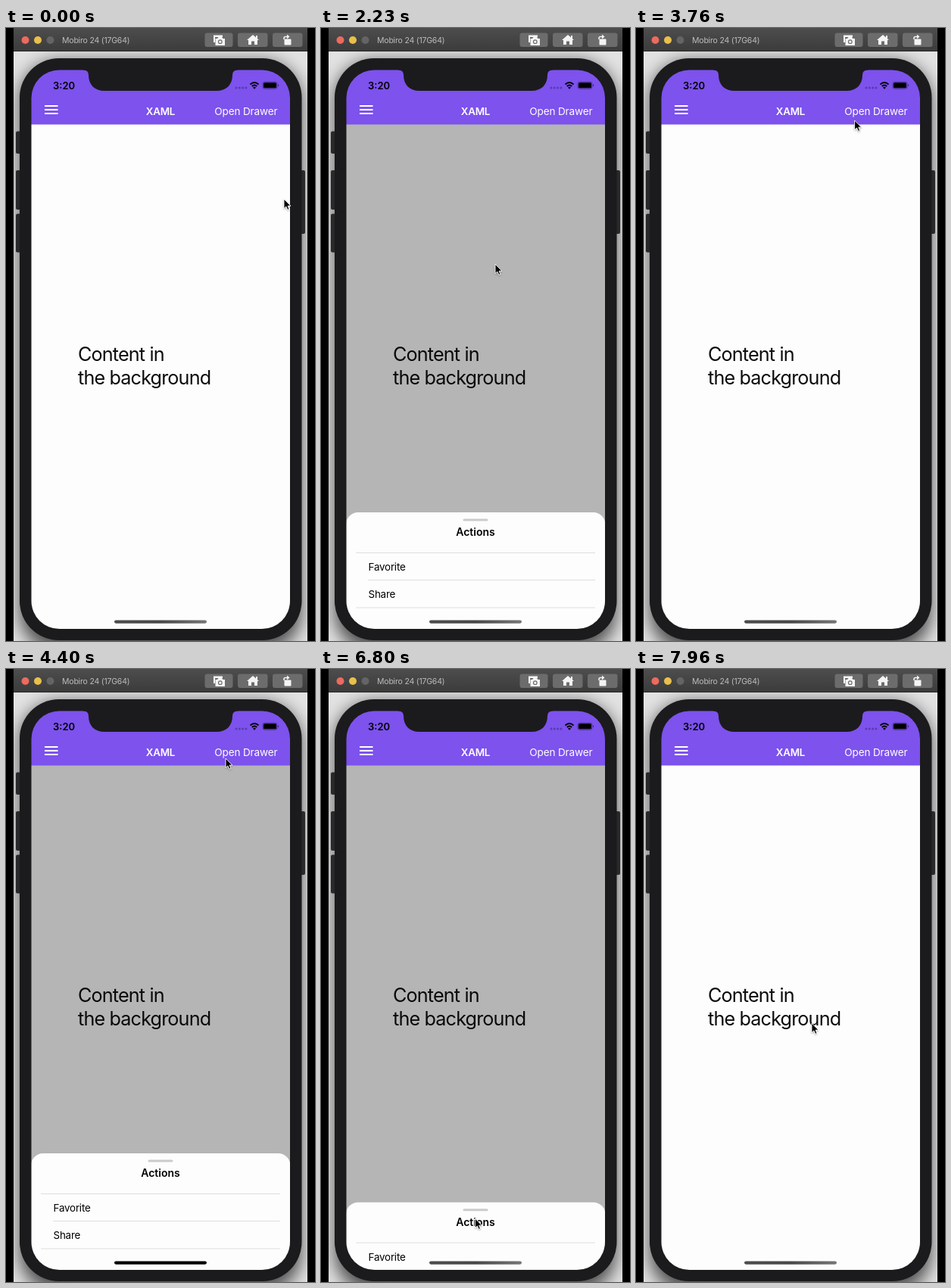
Animation, 408 px wide and 810 px high, one loop 8 s. Source, as an HTML page:

```html
<!DOCTYPE html>
<html lang="en">
<head>
<meta charset="utf-8">
<title>Bottom drawer demo</title>
<style>
  html, body { margin: 0; width: 100%; height: 100%; overflow: hidden; background: #000; }
  svg { display: block; width: 408px; height: 810px; font-family: Inter, Roboto, sans-serif; }
  .item { font-size: 13.4px; letter-spacing: -.2px; }
  .bold { font-weight: 600; }
  #home { mix-blend-mode: multiply; }
</style>
</head>
<body>
<svg viewBox="0 0 408 810">
  <defs>
    <linearGradient id="bar" x2="0" y2="1">
      <stop stop-color="#4d4d4d"/><stop offset="1" stop-color="#3b3b3b"/>
    </linearGradient>
    <linearGradient id="pill">
      <stop stop-color="#4c4c4c"/><stop offset=".5" stop-color="#484848"/><stop offset="1" stop-color="#777"/>
    </linearGradient>
    <filter id="soft" x="-20%" y="-20%" width="140%" height="140%"><feGaussianBlur stdDeviation="11"/></filter>
    <filter id="lift" x="-50%" y="-50%" width="200%" height="200%">
      <feDropShadow dx="0" dy="1" stdDeviation=".8" flood-opacity=".35"/>
    </filter>
    <clipPath id="window"><path d="M10 0H398V810H10Z"/></clipPath>
    <clipPath id="screen"><rect x="33.5" y="55.5" width="341.5" height="738.5" rx="37"/></clipPath>
  </defs>

  <g clip-path="url(#window)">
    <path fill="#e2e2e2" d="M10 0H398V810H10Z"/>
    <rect x="18" y="44" width="372" height="780" rx="52" opacity=".65" filter="url(#soft)"/>
    <path fill="url(#bar)" d="M10 0H398V31H10Z"/>
    <path fill="#262626" d="M10 30H398V31H10Z"/>
  </g>

  <!-- window title bar -->
  <circle cx="25.5" cy="16" r="5" fill="#ed6a5e"/>
  <circle cx="42" cy="16" r="5" fill="#e9bf4c"/>
  <circle cx="58.5" cy="16" r="5" fill="#646464"/>
  <text x="74" y="20" font-size="10.5" letter-spacing="-.2" fill="#bcbcbc">Mobiro 24 (17G64)</text>
  <g fill="#6c6c6c">
    <rect x="262.5" y="6.5" width="37" height="18.5" rx="3"/>
    <rect x="306" y="6.5" width="39.5" height="18.5" rx="3"/>
    <rect x="352" y="6.5" width="39.5" height="18.5" rx="3"/>
  </g>
  <g fill="#f4f4f4">
    <path d="M274 9.5H286V12H276V19H274Z"/>
    <path d="M276.500 14H279L280.500 12H285L286.500 14H289V23H276.500Z"/>
    <path d="M326 9L334 16H332V22H328V17.500H324V22H320V16H318ZM330 10H332V14H330Z"/>
    <rect x="367.500" y="14.500" width="9" height="8" rx="1"/>
    <path d="M371 8.500L374.500 11.500L371 14.500Z"/>
  </g>
  <circle cx="282.800" cy="18.200" r="2.300" fill="none" stroke="#6c6c6c" stroke-width="1.200"/>
  <path d="M367 15V13.500Q367 11.500 369 11.500H372" fill="none" stroke="#f4f4f4" stroke-width="1.500"/>

  <!-- phone body -->
  <g fill="#29292b">
    <rect x="13" y="136.500" width="7" height="29.500" rx="2"/>
    <rect x="13" y="188" width="7" height="52" rx="2"/>
    <rect x="13" y="245.500" width="7" height="51" rx="2"/>
    <rect x="388" y="188" width="7" height="84" rx="2"/>
  </g>
  <rect x="18" y="40" width="372.500" height="769" rx="52" fill="#1b1b1d"/>

  <g clip-path="url(#screen)">
    <path fill="#fdfdfd" d="M33 55H376V795H33Z"/>
    <g font-size="25.200" letter-spacing="-.85" fill="#0c0c0c">
      <text x="95" y="439.800">Content in</text>
      <text x="95" y="471">the background</text>
    </g>
    <path id="scrim" d="M33 127H376V795H33Z"/>
    <path fill="#7d52ed" d="M33 55H376V127.500H33Z"/>

    <g id="drawer">
      <rect x="33" y="640" width="342.500" height="190" rx="16" fill="#fdfdfd"/>
      <rect x="187.500" y="648.500" width="33" height="3" rx="1.500" fill="#cbcbcb"/>
      <text x="204" y="671" font-size="14" class="bold" text-anchor="middle">Actions</text>
      <path d="M46 693.500H362M62 729.500H362M46 766H362" stroke="#dedede"/>
      <text x="62.500" y="717" class="item">Favorite</text>
      <text x="62.500" y="753" class="item">Share</text>
    </g>
    <rect id="home" x="143" y="782.400" width="122" height="4.300" rx="2.100"/>
  </g>

  <!-- notch, status and navigation -->
  <path fill="#1b1b1d" d="M102 54V55.500Q109 55.500 109 62C109 75 117 83 130 83H278C291 83 299 75 299 62Q299 55.500 306 55.500V54Z"/>
  <text x="62" y="80.500" font-size="13" class="bold">3:20</text>
  <path d="M304 79H318" stroke="#5a3bb2" stroke-width="3" stroke-linecap="round" stroke-dasharray="0 4.300"/>
  <path d="M322.500 74.500Q328 69.500 333.500 74.500M324.800 77Q328 74 331.200 77" fill="none" stroke="#000" stroke-width="1.900"/>
  <path d="M326 78.500Q328 76.800 330 78.500L328 80.700Z"/>
  <rect x="339" y="71.300" width="19" height="9" rx="2.500" fill="none" stroke="#4a3093"/>
  <rect x="340" y="72.300" width="17" height="7" rx="1.500"/>
  <path d="M359.300 74.300Q361 75.800 359.300 77.300Z"/>
  <path d="M51 103H68.500M51 108H68.500M51 113H68.500" stroke="#fff" stroke-width="2.200"/>
  <text x="204" y="114.500" class="item bold" fill="#fff" text-anchor="middle">XAML</text>
  <text id="open" x="275.300" y="114.500" font-size="13.600" letter-spacing="-.17" fill="#fff">Open Drawer</text>

  <path id="cursor" d="M0 0V12.500L2.900 9.900L4.900 14.300L7 13.400L5.100 9.100H9Z"
        fill="#000" stroke="#fff" stroke-width=".9" filter="url(#lift)"/>
</svg>
<script>
const LOOP = 8000, HIDDEN = 155, GRAB_TIME = 5540, GRAB_Y = 658, FOLLOW = .95;
const set = (id, name, value) => document.getElementById(id).setAttribute(name, value);
const within = (t, a, b) => t >= a && t < b;
const ramp = (t, a, b) => Math.min(1, Math.max(0, (t - a) / (b - a)));
const ease = (t, a, b) => { const u = ramp(t, a, b); return u * u * (3 - 2 * u); };

// Each gesture eases to a point, optionally swinging aside early on the way
const gestures = [
  { from: 0, to: 830, x: 342, y: 157, swingX: 28, swingY: 54 },
  { from: 860, to: 1260, x: 328, y: 112 },
  { from: 1930, to: 2230, x: 230, y: 312 },
  { from: 3030, to: 3830, x: 290, y: 118, swingX: -36 },
  { from: 4470, to: 4760, x: 212, y: 650 },
  { from: 5000, to: 5360, x: 203, y: GRAB_Y, swingY: 8 },
  { from: GRAB_TIME, to: 6100, x: 203, y: 695 },
  { from: 6100, to: 6390, x: 203, y: 680 },
  { from: 6390, to: 7280, x: 204, y: 784 },
  { from: 7830, to: 7960, x: 232, y: 468 }
];

function cursorAt(t) {
  let x = 367, y = 226;
  for (const g of gestures) {
    const e = ease(t, g.from, g.to), swing = 6.75 * e * (1 - e) ** 2;
    x += (g.x - x) * e + (g.swingX || 0) * swing;
    y += (g.y - y) * e + (g.swingY || 0) * swing;
  }
  return { x, y };
}

function draw(now) {
  const t = now % LOOP;
  const { x, y } = cursorAt(t);
  set('cursor', 'transform', `translate(${x} ${y})`);

  const shown = ease(t, 1480, 1720) - ease(t, 2730, 2860) + ease(t, 4150, 4370);
  const pull = t > GRAB_TIME ? (y - GRAB_Y) * FOLLOW : HIDDEN * (1 - shown);
  const drop = pull + (HIDDEN - pull) * ramp(t, 7300, 7360);
  set('drawer', 'transform', `translate(0 ${drop})`);
  set('scrim', 'opacity', .285 * (shown - ramp(t, 7220, 7360) ** 2));

  const pressed = within(t, 1320, 1490) || within(t, 3990, 4150);
  set('open', 'opacity', pressed ? .35 : 1);
  const solid = within(t, 1660, 1750) || within(t, 4330, 4490);
  set('home', 'fill', solid ? '#000' : 'url(#pill)');
}

const start = performance.now();
function tick() {
  draw(performance.now() - start);
  requestAnimationFrame(tick);
}
tick();
</script>
</body>
</html>
```
